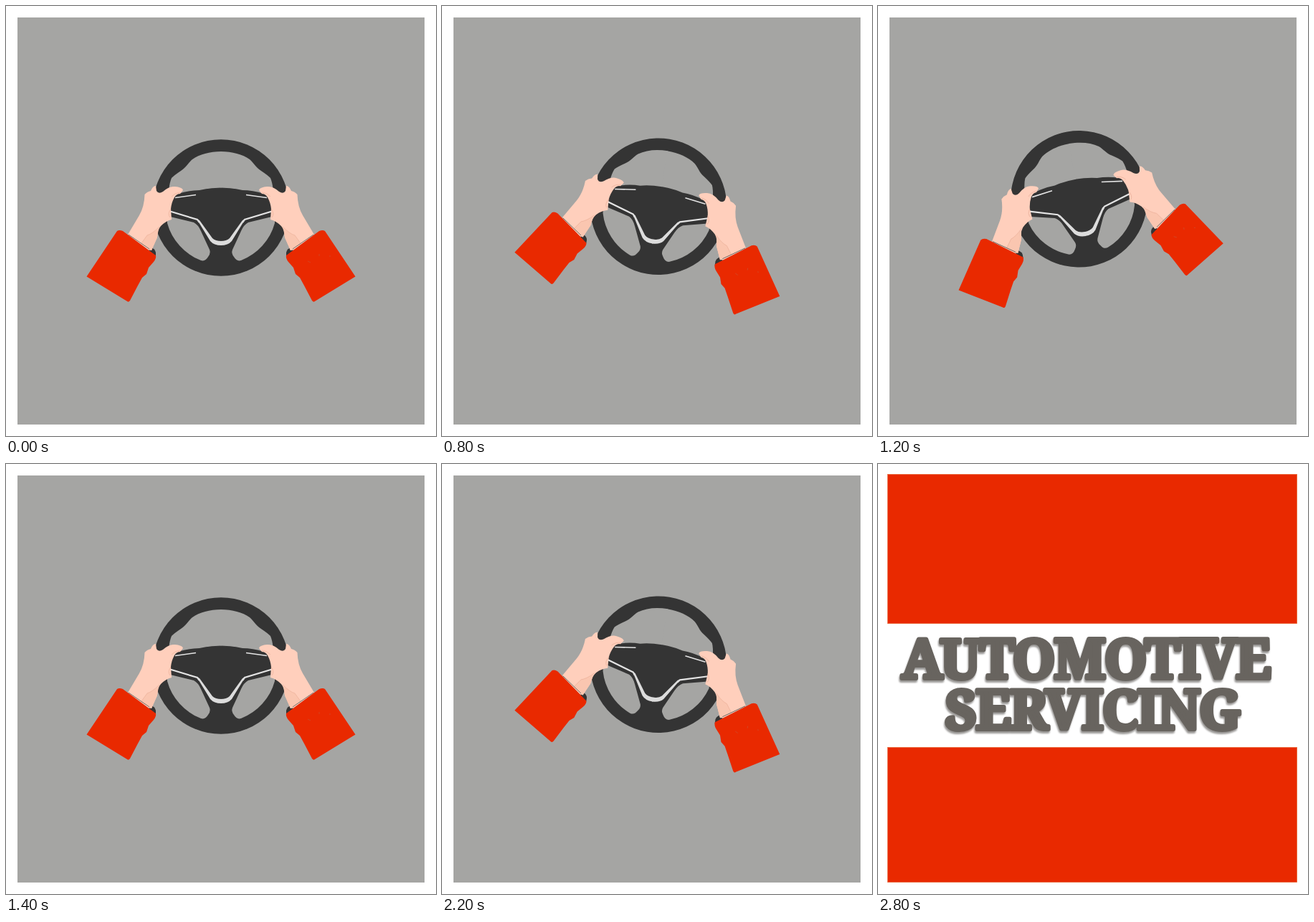
These frames come from a looping animation (600 by 600 pixels, 3.3 s). An HTML page:

```html
<!DOCTYPE html>
<html lang="en">
<head>
<meta charset="utf-8">
<title>Automotive servicing</title>
<style>
  html, body { margin: 0; width: 100%; height: 100%; overflow: hidden; background: #fff; }
  svg { display: block; width: 100%; height: 100%; }
  .dark { fill: #343434; }
  .gray { fill: #a5a5a3; }
  .red { fill: #e92900; }
  .trim { fill: none; stroke: #e4e4e4; }
  .crease { fill: none; stroke: #eeb49e; }
  #title text {
    font: bold 76px "Noto Serif", serif; letter-spacing: -2px; text-anchor: middle;
    fill: #68645f; stroke: #68645f; stroke-width: 6; stroke-linejoin: round;
    filter: drop-shadow(-1px 3px 1px #999795);
  }
</style>
</head>
<body>
<svg viewBox="0 0 600 600">
  <defs>
    <!-- left half of the details; the right half is its mirror image -->
    <g id="wheelHalf">
      <path class="gray" d="M300.5 203C284 203 270 207 260 214C254 219 252 225 244 230Q235 236 231 240Q228 247 227 259L240 262Q256 257 270 257Q284 253.5 300.5 253.5Z"/>
      <path class="gray" d="M225 293L262 302Q268 305 272 314L284 340Q286 345 282 350Q278 357 272 355A78 78 0 0 1 225 303Z"/>
      <path class="trim" stroke-width="1.6" d="M236 267.5L265 263.5"/>
      <path class="trim" stroke-width="2.2" d="M229 286.5L267 298L270 302"/>
      <path fill="#dcdcdc" d="M266 297L270 299L288 324Q292 328 300.5 328V334Q290 334 285 328Z"/>
    </g>
    <g id="arm">
      <path class="dark" d="M201 337Q208 338 209 344V350L199 345Z"/>
      <path fill="#ffcfbc" d="M170 319L186 292Q193 280 193.5 263Q197 259 202 258Q205 251 209 251L210 258Q213 263 219 259Q228 251 236 252Q246 253 247 257L243 262Q238 262 235 267Q231 274 230 283L231 298Q223 300 216 307Q211 313 211 323L203 341L198 340Z"/>
      <path fill="#fac6b0" d="M213 310Q203 318 197 320L188 332L203 341L211 323Z"/>
      <path class="crease" stroke-width=".8" d="M230 283Q225 290 229 295M214 308Q204 318 197 320L189 331M231 266Q235 261 243 260"/>
      <path fill="none" stroke="#555" stroke-width=".8" d="M171 319L200 339"/>
      <path class="red" d="M155 314Q158 312 163 314L209 348Q210 352 206 357L199 365L196 374L190 379L184 390L173 411Q171 414 169 412L112.5 377.5Z"/>
    </g>
  </defs>

  <g id="drive">
    <rect class="gray" x="16" y="16" width="568" height="568"/>
    <g id="rig">
      <circle class="dark" cx="300" cy="281.5" r="95.3"/>
      <use href="#wheelHalf"/>
      <use href="#wheelHalf" transform="matrix(-1 0 0 1 600 0)"/>
      <use href="#arm"/>
      <use href="#arm" transform="matrix(-1 0 0 1 600 0)"/>
      <path fill="none" stroke="#d04a28" stroke-width=".8" d="M421 356l4 2M437 346v3M451 349h2"/>
    </g>
  </g>

  <g id="title">
    <g class="red" stroke="#e8602c" stroke-width=".8">
      <rect x="13.5" y="14.5" width="571" height="208"/>
      <rect x="13.5" y="395.5" width="571" height="188"/>
    </g>
    <text x="290" y="299">AUTOMOTIVE</text>
    <text x="299" y="370">SERVICING</text>
  </g>
</svg>
<script>
  const LOOP = 3300, TITLE_START = 2800, STEP = 200;
  // Steering poses: angle in degrees, then the wheel centre
  const poses = [
    [0, 300, 281.5], [8, 302.6, 281.7], [-5, 296.5, 279.8], [2.6, 300.8, 280],
    [9.4, 302, 279.7], [25, 308, 283.2], [-10, 280.5, 269.3]
  ];
  const byId = id => document.getElementById(id);
  const rig = byId("rig"), drive = byId("drive"), title = byId("title");
  const show = (node, visible) => node.setAttribute("display", visible ? "inline" : "none");

  function draw(now) {
    const time = now % LOOP;
    const [angle, x, y] = poses[Math.floor(time / STEP) % poses.length];
    rig.setAttribute("transform", `translate(${x} ${y}) rotate(${angle}) translate(-300 -281.5)`);
    show(drive, time < TITLE_START);
    show(title, time >= TITLE_START);
    requestAnimationFrame(draw);
  }
  draw(performance.now());
</script>
</body>
</html>
```
